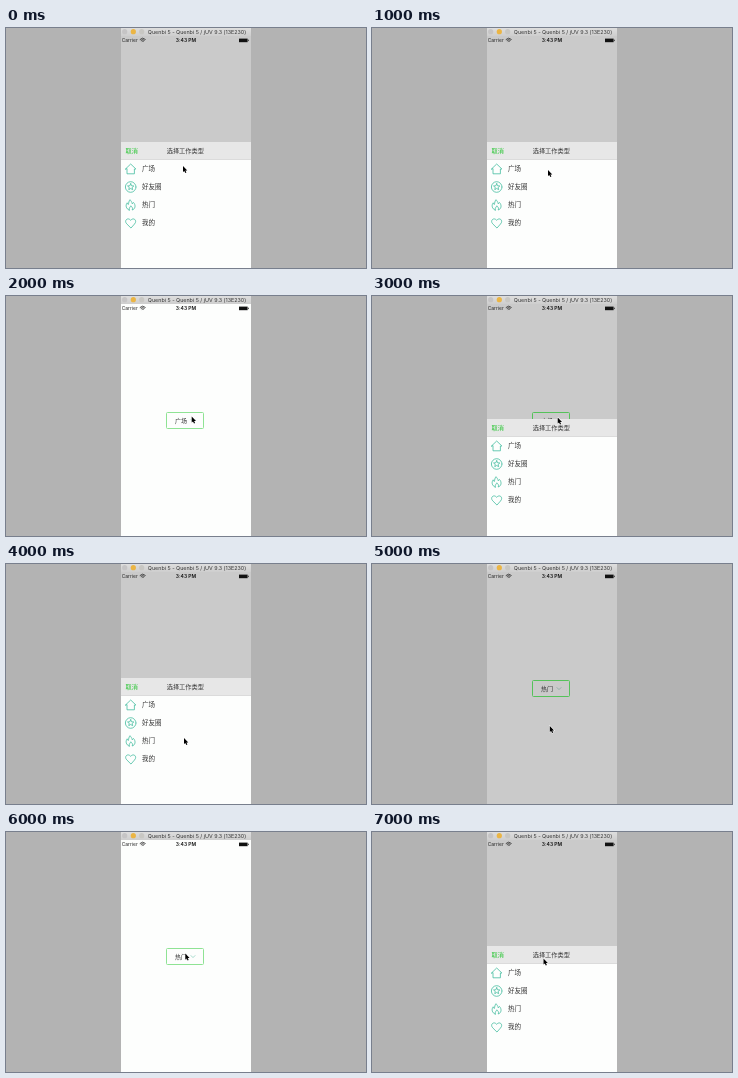
An HTML page with a canvas for the animation above (8000 ms loop, 360 by 240 pixels).

```html
<!DOCTYPE html>
<html lang="zh">
<head>
<meta charset="utf-8">
<title>Action sheet demo</title>
<style>
html, body { margin: 0; width: 100%; height: 100%; overflow: hidden; background: #b3b3b3; }
canvas { display: block; width: 360px; height: 240px; }
</style>
</head>
<body>
<canvas id="stage" width="360" height="240"></canvas>
<script>
const ctx = document.getElementById('stage').getContext('2d');
const CJK = '"Noto Sans CJK SC", "Noto Sans CJK", sans-serif';
const LATIN = 'Inter, sans-serif';
const TEAL = '#45bda0';
const LEFT = 115, WIDTH = 130, SHEET_TOP = 114;
const STEP_MS = 1000;

// One pose per second: sheet top (null = closed), dimmed page, button label, pointer tip.
const steps = [
  { sheet: SHEET_TOP, dim: true, label: '广场', pointer: [177, 138] },
  { sheet: SHEET_TOP, dim: true, label: '广场', pointer: [176, 142] },
  { sheet: null, dim: false, label: '广场', pointer: [185.7, 120.5] },
  { sheet: 123, dim: true, label: '广场', pointer: [185.7, 121.5] },
  { sheet: SHEET_TOP, dim: true, label: '广场', pointer: [178, 174] },
  { sheet: null, dim: true, label: '热门', pointer: [177.8, 162] },
  { sheet: null, dim: false, label: '热门', pointer: [179.3, 121.5] },
  { sheet: SHEET_TOP, dim: true, label: '广场', pointer: [171.5, 126.5] }
];

function rect(x, y, w, h, color) {
  ctx.fillStyle = color;
  ctx.fillRect(x, y, w, h);
}

function text(str, x, y, size, color, family, align = 'left', weight = 400) {
  ctx.font = `${weight} ${size}px ${family}`;
  ctx.textAlign = align;
  ctx.textBaseline = 'alphabetic';
  ctx.fillStyle = color;
  ctx.fillText(str, x, y);
}

function stroke(path, x, y, color = TEAL, width = 0.8) {
  ctx.save();
  ctx.translate(x, y);
  ctx.strokeStyle = color;
  ctx.lineWidth = width;
  ctx.lineJoin = ctx.lineCap = 'round';
  ctx.stroke(path);
  ctx.restore();
}

function dot(x, y, r, color) {
  ctx.fillStyle = color;
  ctx.beginPath();
  ctx.arc(x, y, r, 0, Math.PI * 2);
  ctx.fill();
}

function starPath() {
  const path = new Path2D();
  path.arc(0, 0, 5.3, 0, Math.PI * 2);
  for (let i = 0; i <= 10; i++) {
    const r = i % 2 ? 1.5 : 3.3, a = i * Math.PI / 5 - Math.PI / 2;
    path[i ? 'lineTo' : 'moveTo'](r * Math.cos(a), r * Math.sin(a));
  }
  return path;
}

const rows = [
  ['广场', new Path2D('M-5.2 0L0-5L5.2 0H3.7V4.8H-3.7V0Z')],
  ['好友圈', starPath()],
  ['热门', new Path2D('M-1.5 5C-5 4-5.3 0-3.5-2.2L-2.4-.5C-1.8-2-2-4-.7-5.3C.2-4 1.4-3 1.5-1.2L2.8-2.5C5.2 0 4.8 4 1.5 5C2.5 3 1.2 2 .1.8C-.4 2.3-2.2 3-1.5 5Z')],
  ['我的', new Path2D('M0 4.7C-2-.0-1 3.6-4 .8C-7-2.4-3-6.5 0-2.7C3-6.5 7-2.4 4 .8Z')]
];
rows[3][1] = new Path2D('M0 4.8L-4 .8C-7-2.4-3-6.2 0-2.7C3-6.2 7-2.4 4 .8Z');

const chevron = new Path2D('M-2-1L0 1L2-1');
const arrow = new Path2D('M0 0V6L1.3 4.9L2.3 7.1L3.4 6.6L2.4 4.5H4.3Z');

function drawTitleBar() {
  const shade = ctx.createLinearGradient(0, 0, 0, 8);
  shade.addColorStop(0, '#dedede');
  shade.addColorStop(1, '#cecece');
  rect(LEFT, 0, WIDTH, 8, shade);
  dot(118.7, 3.7, 2.6, '#c5c4c5');
  dot(127.3, 3.7, 2.6, '#ebb544');
  dot(135.7, 3.7, 2.6, '#c8c7c3');
  text('Quenbi 5 - Quenbi 5 / jUV 9.3 (13E230)', 191, 5.8, 5.35, '#333', LATIN, 'center');
}

function drawStatusBar() {
  text('Carrier', 115.8, 14.2, 4.9, '#222', LATIN);
  text('3:43 PM', 180, 14.2, 5, '#111', LATIN, 'center', 600);
  ctx.strokeStyle = '#222';
  ctx.lineWidth = 0.8;
  for (const r of [1.2, 2.6, 4]) {
    ctx.beginPath();
    ctx.arc(136.7, 14.4, r, -Math.PI * 0.76, -Math.PI * 0.24);
    ctx.stroke();
  }
  rect(233, 10.6, 8.6, 3.6, '#111');
  rect(242, 11.7, 0.8, 1.4, '#333');
}

function drawButton(label, dim) {
  ctx.strokeStyle = dim ? '#55c25a' : '#8fe394';
  ctx.lineWidth = 1;
  ctx.beginPath();
  ctx.roundRect(160.5, 116.5, 37, 16, 1);
  ctx.stroke();
  text(label, 169, 126.7, 6, '#333', CJK);
  stroke(chevron, 187, 124.6, dim ? '#87aaa1' : '#8ed2c0');
}

function drawSheet(top) {
  rect(LEFT, top, WIDTH, 240 - top, '#fdfefd');
  rect(LEFT, top, WIDTH, 18, '#e7e7e7');
  rect(LEFT, top + 17.5, WIDTH, 0.5, '#cfcfcf');
  text('取消', 119.5, top + 11.3, 6.2, '#25c530', CJK, 'left', 500);
  text('选择工作类型', 179.3, top + 11.3, 6.2, '#333', CJK, 'center');
  rows.forEach(([name, icon], i) => {
    const y = top + 27 + i * 18;
    stroke(icon, 124.7, y);
    text(name, 136, y + 2.3, 6.5, '#333', CJK);
  });
}

function drawPointer(x, y) {
  stroke(arrow, x, y, '#fff', 0.8);
  ctx.save();
  ctx.translate(x, y);
  ctx.fillStyle = '#000';
  ctx.fill(arrow);
  ctx.restore();
}

function draw() {
  const step = steps[Math.floor(performance.now() / STEP_MS) % steps.length];
  rect(0, 0, 360, 240, '#b3b3b3');
  rect(LEFT, 8, WIDTH, 232, step.dim ? '#cacaca' : '#fdfefd');
  drawTitleBar();
  drawStatusBar();
  drawButton(step.label, step.dim);
  if (step.sheet !== null) drawSheet(step.sheet);
  drawPointer(...step.pointer);
  requestAnimationFrame(draw);
}

draw();
</script>
</body>
</html>
```
